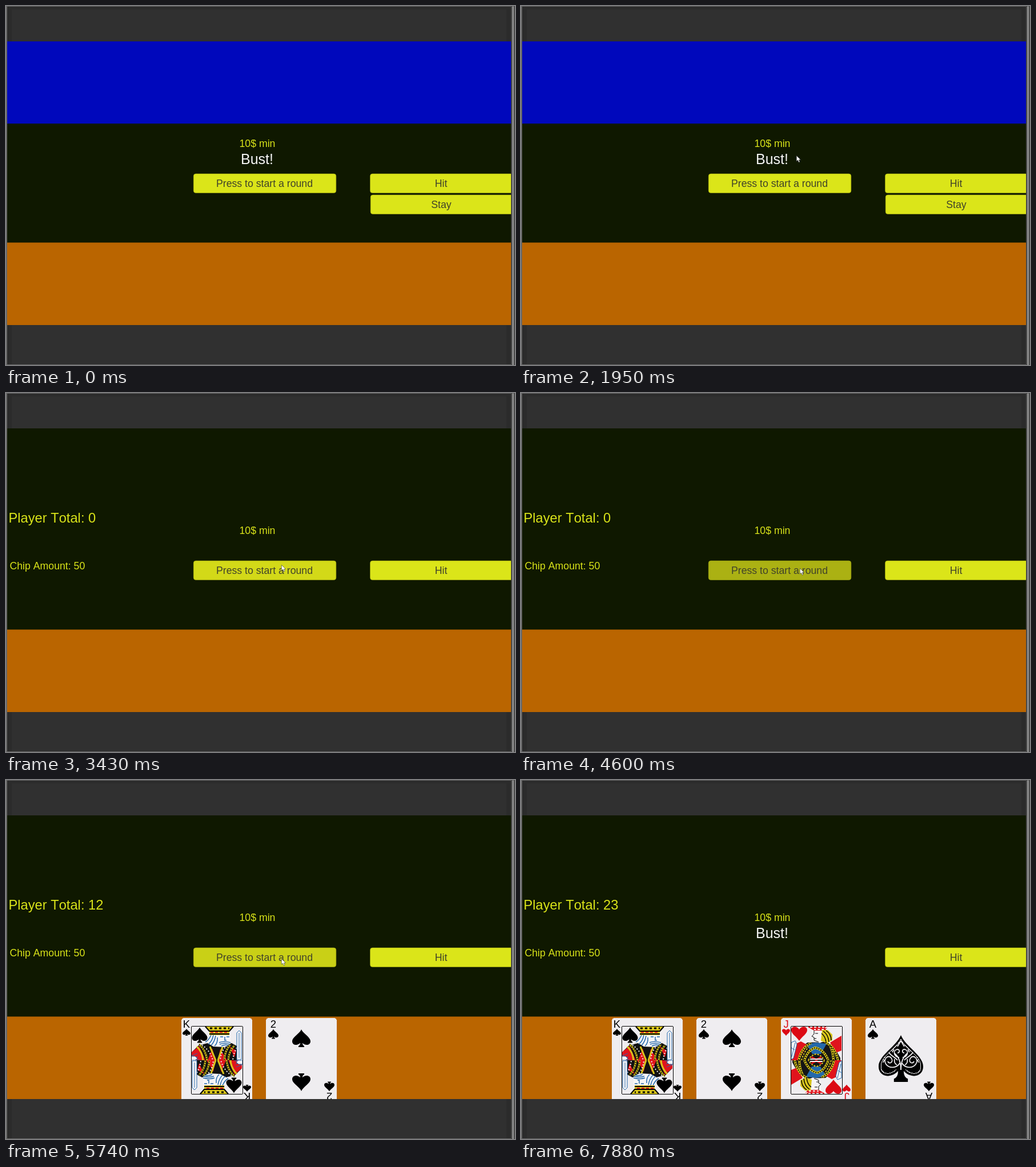
Animation, 891 px wide and 629 px high, one loop 8280 ms. Source, as an HTML page:

```html
<!DOCTYPE html>
<html lang="en">
<head>
<meta charset="utf-8">
<title>Card table</title>
<style>
html, body { margin: 0; width: 100%; height: 100%; overflow: hidden; background: #303030; }
svg { display: block; width: 891px; height: 629px; }
text { font: 17.7px "Liberation Sans", Arial, sans-serif; font-kerning: none; fill: #d9e319; }
.mid { text-anchor: middle; }
.big { font-size: 23.7px; }
.bust { font-size: 25px; fill: #f4f4f4; }
.label { fill: #40422a; }
.button { fill: #dbe519; stroke: #a9b114; stroke-width: .6; }
.rank { font-size: 18.5px; text-anchor: middle; fill: inherit; }
.card path, .card rect { shape-rendering: crispEdges; }
.line { fill: none; stroke: #000; }
</style>
</head>
<body>
<svg viewBox="0 0 891 629">
  <defs>
    <clipPath id="felt"><path d="M2 62H884V559H2Z"/></clipPath>
    <clipPath id="half"><path d="M17 14H107V74H17Z"/></clipPath>
    <path id="spade" d="M0-15C3-8 16-2 16 5C16 12 7 13 2 8Q2 12 5 13V15H-5V13Q-2 12-2 8C-7 13-16 12-16 5C-16-2-3-8 0-15Z"/>
    <path id="heart" d="M0 13C-5 5-14 1-14-6C-14-13-4-14 0-7C4-14 14-13 14-6C14 1 5 5 0 13Z"/>

    <g id="king">
      <path fill="#111" d="M18 74V60L30 48L46 44L62 50L88 44L99 50L97 74Z"/>
      <path fill="#e0141c" d="M18 60L31 49L42 74H18ZM68 54L80 74H64ZM54 53L60 74H46ZM84 50L96 57L93 69Z"/>
      <path class="line" stroke="#d8c51c" stroke-width="3" style="stroke:#d8c51c" d="M31 46Q43 56 45 74M27 50Q37 60 38 74M86 46Q76 57 75 74M93 48Q83 58 82 74M50 50L60 74M72 51L64 74"/>
      <path class="line" stroke-width="1.6" stroke-dasharray="2 2" d="M31 46Q43 56 45 74M86 46Q76 57 75 74M93 48Q83 58 82 74"/>
      <path class="line" stroke-width="2" stroke-dasharray="2 3" style="stroke:#f6f4f5" d="M36 47Q51 58 55 74M80 48Q69 58 68 74M97 52Q91 62 90 74"/>
      <path fill="#d8c51c" d="M41 14H92L84 24V30H49V24Z"/>
      <path class="line" stroke-width="2" d="M42 15L49 23H84L91 15M49 28H84"/>
      <path class="line" stroke-width="3" stroke-dasharray="4 4" d="M50 18H84"/>
      <path class="line" stroke-width="2" stroke-dasharray="5 3" style="stroke:#e0141c" d="M51 25H83"/>
      <path fill="#f7f5f6" d="M50 30H86V45L76 51L56 50L46 44Z"/>
      <path class="line" stroke-width="1.5" style="stroke:#2469ac" d="M52 30Q48 39 42 42M56 30Q54 41 47 46M60 31Q58 42 52 48M63 34Q64 44 58 49M66 43Q74 40 86 43M67 46Q75 43 85 46M70 49Q76 46 82 48M68 33H73M79 33H84M76 33V39H79"/>
      <path fill="#f7f5f6" stroke="#2469ac" d="M97 73V26L101 22L105 26V73Z"/>
      <path class="line" style="stroke:#2469ac" d="M101 26V70M18 66L28 62M18 70L29 68M20 73H31"/>
      <path fill="#f7f5f6" stroke="#2469ac" d="M17 67H24L28 71L24 74H17Z"/>
    </g>

    <g id="jack">
      <path fill="#151515" d="M27 74L34 54L46 43L76 42L94 52L104 70V74Z"/>
      <path fill="#e0141c" d="M18 49L35 41L46 47L31 74H18ZM86 43L106 31V57L96 61Z"/>
      <path fill="#e0141c" d="M42 14H83L77 22H58L51 18Z"/>
      <path class="line" stroke-width="2" stroke-dasharray="4 3" style="stroke:#f7f5f6" d="M44 16H80L74 20H58"/>
      <path fill="#f7f5f6" d="M54 22H76V40L68 44L55 39Z"/>
      <path class="line" d="M58 22V28L54 32L58 34V39L66 42M60 27H65M58 36H62"/>
      <path fill="#d8c51c" d="M72 21H82L90 29V39L80 44L70 40Z"/>
      <path class="line" stroke-width="1.5" d="M74 23Q83 29 84 42M79 22Q88 28 88 39M71 27Q78 32 79 43"/>
      <path fill="#2469ac" d="M45 46L61 43L80 45L70 63H55Z"/>
      <path class="line" stroke-width="4" style="stroke:#d8c51c" d="M31 74Q36 51 53 44M41 74Q46 57 60 52Q75 55 83 74M78 43Q94 49 100 74M86 49Q91 57 92 74"/>
      <path class="line" stroke-width="2" stroke-dasharray="2 2" d="M31 74Q36 51 53 44M41 74Q46 57 60 52Q75 55 83 74M78 43Q94 49 100 74M86 49Q91 57 92 74"/>
      <path class="line" stroke-width="2" stroke-dasharray="3 2" style="stroke:#d8c51c" d="M48 74Q52 65 62 63Q72 66 76 74M36 74Q40 60 48 51"/>
      <path class="line" stroke-width="3" style="stroke:#e0141c" d="M53 68L62 73L71 68"/>
      <path class="line" stroke-width="2" style="stroke:#f7f5f6" d="M51 72H73"/>
      <path fill="#f7f5f6" stroke="#2469ac" d="M18 43L25 40L28 46L22 70L18 73Z"/>
      <path class="line" style="stroke:#2469ac" d="M25 43L19 68M18 52L24 56"/>
    </g>

    <g id="curls" fill="none" stroke="#efedf0" stroke-width="1.8">
      <path d="M0 20C0 4 5-4 11-9M2 8C7 17 20 18 26 10C32 1 22-8 17-1C12 6 20 11 23 5M3-2C13-3 14-14 7-16C1-17 2-9 6-10M6 3C10-2 18-5 21-11M7 11C11 9 12 5 11 1M0-31L6-21M12-16L15-11M29 2L31 7"/>
    </g>
  </defs>

  <path fill="#696969" d="M0 0H891V629H0Z"/>
  <path fill="#2b2b2b" d="M2 1H884V628H2Z"/>
  <path fill="#303030" d="M10 6H876V628H10Z"/>
  <path fill="#484848" d="M884 0H886V629H884ZM889 0H891V629H889Z"/>
  <path fill="#8b8b8b" d="M886 1H889V629H886Z"/>

  <g clip-path="url(#felt)">
    <path fill="#0f1800" d="M2 62H884V415H2Z"/>
    <path id="blue" fill="#0008bc" d="M2 62H884V206H2Z"/>
    <path fill="#ba6500" d="M2 414.5H884V559H2Z"/>
    <text class="mid" x="440" y="247">10$ min</text>
    <text class="mid bust" id="bust" x="439.5" y="276.5">Bust!</text>
    <g id="totals">
      <text class="big" id="total" x="4.5" y="227">Player Total: 0</text>
      <text x="6.5" y="308.7">Chip Amount: 50</text>
    </g>
    <g id="start">
      <rect class="button" id="face" x="328.3" y="294" width="249.5" height="33.5" rx="4"/>
      <text class="mid label" x="452.5" y="317">Press to start a round</text>
    </g>
    <rect class="button" x="637.5" y="294" width="249.5" height="33.5" rx="4"/>
    <text class="mid label" x="761.5" y="317">Hit</text>
    <g id="stay">
      <rect class="button" x="638.2" y="331" width="249.5" height="33.5" rx="4"/>
      <text class="mid label" x="762" y="354.3">Stay</text>
    </g>
    <g id="hand"></g>
  </g>
  <path id="cursor" fill="#fff" stroke="#333" stroke-width=".6" d="M.3.3V10L2.6 8L4.3 12L6 11.3L4.5 7.5H7.6Z"/>
</svg>

<script>
const LOOP = 8280;
const el = id => document.getElementById(id);

// Every table is a list of [start time, value], held until the next start.
const phases = [
  [0, { blue: 1, bust: 1, start: 1, stay: 1, total: 0, cards: 0 }],
  [3430, { start: 1, totals: 1, total: 0, cards: 0 }],
  [4750, { start: 1, totals: 1, total: 12, cards: 2 }],
  [5860, { bust: 1, totals: 1, total: 23, cards: 4 }]
];

const tints = [
  [0, '#dbe519'], [3430, '#d3d918'], [3550, '#dbe519'], [4600, '#abb113'],
  [4750, '#c4cc16'], [4870, '#dbe519'], [5740, '#c9d016']
];

const moves = [
  [0, null], [1370, [481, 6]], [1490, [479, 170]], [1640, [482, 253]],
  [1800, [482, 255]], [1950, [482, 262]], [2070, [482, 267]], [2210, [482, 275]],
  [2330, [482, 282]], [2480, [482, 284]], [2600, [482, 287]], [2730, [482, 291]],
  [3010, [482, 297]], [3160, [482, 299]], [3280, [482, 301]], [3550, [482, 303]],
  [3670, [482, 311]], [3790, [482, 322]], [4050, [483, 333]], [4180, [484, 322]],
  [4330, [486, 314]], [4450, [488, 307]], [5060, [485, 312]], [5210, [482, 313]],
  [6690, [482, 317]], [7220, [494, 330]], [7340, [548, 384]], [7460, [640, 474]],
  [7580, [742, 570]], [7730, [809, 613]], [7880, null]
];

const current = (steps, t) => steps.filter(([start]) => start <= t).pop()[1];

const pip = (suit, x, y, w, h = w) => {
  const size = suit === 'spade' ? [32, 30] : [28, 25];
  return `<use href="#${suit}" transform="translate(${x} ${y}) scale(${w / size[0]} ${h / size[1]})"/>`;
};
const twice = art => art + `<g transform="rotate(180 62 74)">${art}</g>`;

function card(rank, suit, art, edge) {
  const color = suit === 'heart' ? '#dc0a14' : '#000';
  const corner = `<text class="rank" x="${edge}" y="17">${rank}</text>` +
    (edge < 10 ? pip(suit, edge, 25, 14, 12) : pip(suit, edge, 28, 18, 17));
  return `<g class="card" fill="${color}">
    <rect width="124" height="148" rx="5" fill="#efedf0"/>${art}${twice(corner)}</g>`;
}

function court(figure, suit, w, h, y) {
  return twice(`<g clip-path="url(#half)"><use href="#${figure}"/></g>`) +
    '<rect class="line" x="17.5" y="14.5" width="90" height="119" rx="2"/>' +
    twice(pip(suit, 32, y, w, h));
}

const ace = pip('spade', 62, 71, 78, 82) +
  '<g transform="translate(62 71)"><use href="#curls"/><use href="#curls" transform="scale(-1 1)"/></g>' +
  '<path fill="none" stroke="#efedf0" d="M62 37C68 54 97 65 97 85C97 98 82 102 70 90M62 37C56 54 27 65 27 85C27 98 42 102 54 90"/>';

el('hand').innerHTML =
  card('K', 'spade', court('king', 'spade', 27, 27, 30), 9) +
  card('2', 'spade', twice(pip('spade', 62, 35.5, 32, 31)), 13) +
  card('J', 'heart', court('jack', 'heart', 28, 25, 27), 9) +
  card('A', 'spade', ace, 13);
const hand = [...el('hand').children];

const show = (node, on) => { node.style.display = on ? '' : 'none'; };
const place = (node, x, y) => node.setAttribute('transform', `translate(${x} ${y})`);

function draw(t) {
  const phase = current(phases, t);
  for (const id of ['blue', 'bust', 'start', 'stay', 'totals']) show(el(id), phase[id]);
  el('total').textContent = 'Player Total: ' + phase.total;
  el('face').style.fill = current(tints, t);

  const left = 443 - (phase.cards * 148 - 24) / 2;
  hand.forEach((node, i) => {
    show(node, i < phase.cards);
    place(node, left + i * 148, 417);
  });

  const tip = current(moves, t);
  show(el('cursor'), tip);
  if (tip) place(el('cursor'), ...tip);
}

const begin = performance.now();
function tick() {
  draw((performance.now() - begin) % LOOP);
  requestAnimationFrame(tick);
}
tick();
</script>
</body>
</html>
```
